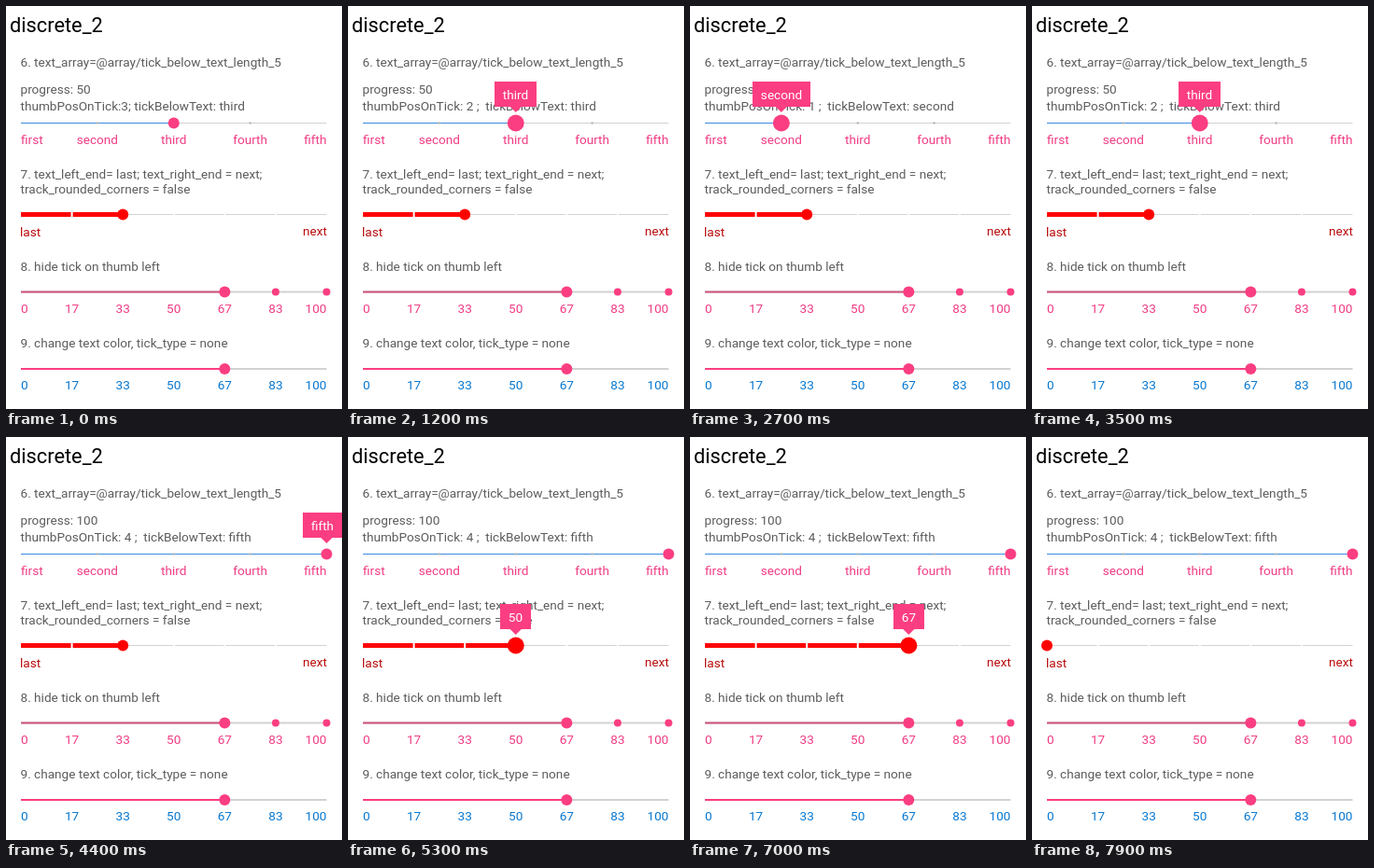
An HTML page for the animation above (8000 ms loop, 360 px wide and 432 px high).

```html
<!DOCTYPE html>
<html lang="en">
<head>
<meta charset="utf-8">
<title>Discrete sliders</title>
<style>
  html, body { margin: 0; width: 100%; height: 100%; overflow: hidden; background: #fff; }
  svg { display: block; width: 360px; height: 432px; }
  text { font: 13.6px Roboto, sans-serif; fill: #5c5c5c; white-space: pre; }
  .title { font-size: 21.8px; fill: #000; }
  .pink { fill: #f03c84; }
  .red { fill: #b80c0c; }
  .blue { fill: #0878d0; }
  .white { fill: #fff; }
</style>
</head>
<body>
<svg id="stage" viewBox="0 0 360 432"></svg>
<script>
const LOOP = 8000, WIDTH = 360, LEFT = 16, RIGHT = 343.5;
const PINK = '#fb3e81', RED = '#ff0000', GRAY = '#d2d2d2', BLUE = '#3a8be0', MAUVE = '#d0557f';
const WORDS = ['first', 'second', 'third', 'fourth', 'fifth'];
const PERCENTS = Array.from({ length: 7 }, (_, i) => Math.round(i * 100 / 6));
const stage = document.getElementById('stage');

function add(tag, attrs, parent = stage) {
  const node = document.createElementNS('http://www.w3.org/2000/svg', tag);
  set(node, attrs);
  return parent.appendChild(node);
}

function set(node, attrs) {
  for (const key in attrs) node.setAttribute(key, attrs[key]);
}

function label(x, y, content, cls = '', anchor = 'start', parent = stage) {
  const node = add('text', { x, y, class: cls, 'text-anchor': anchor }, parent);
  node.textContent = content;
  return node;
}

const caption = (y, content) => label(15.5, y, content);
const line = (y, stroke, width, x2 = RIGHT) =>
  add('line', { x1: LEFT, x2, y1: y, y2: y, stroke, 'stroke-width': width });
const dot = (cx, cy, r, fill) => add('circle', { cx, cy, r, fill });
const tickX = (i, count) => LEFT + (RIGHT - LEFT) * i / (count - 1);

function tickLabels(names, y, cls) {
  const last = names.length - 1;
  names.forEach((name, i) => {
    const anchor = i === 0 ? 'start' : i === last ? 'end' : 'middle';
    label(tickX(i, names.length), y, name, cls, anchor);
  });
}

function makeBubble(trackY) {
  const group = add('g', {});
  const top = Math.round(trackY - 45);
  const box = add('rect', { y: top, height: 27, fill: PINK }, group);
  const arrow = add('path', { fill: PINK }, group);
  const text = label(0, top + 18.5, '', 'white', 'middle', group);
  return (visible, x, content) => {
    set(group, { visibility: visible ? 'visible' : 'hidden' });
    text.textContent = content;
    const width = Math.round(text.getComputedTextLength() + 18);
    const left = Math.round(Math.max(0, Math.min(WIDTH - width, x - width / 2)));
    set(box, { x: left, width });
    set(text, { x: left + width / 2 });
    set(arrow, { d: `M${x - 6.5} ${top + 26.5}h13l-6.5 6.5z` });
  };
}

// A live slider: the finger goes from one tick to another and back, the thumb snaps to ticks.
function makeSlider({ y, names, track, thickness, color, marks, drag }) {
  line(y, GRAY, 1);
  const fill = line(y, track, thickness);
  for (let i = 1; i < names.length - 1; i++) marks(tickX(i, names.length), y);
  const thumb = dot(0, y, 6, color);
  const showBubble = makeBubble(y);
  return time => {
    const tick = Math.round(finger(time, drag));
    const x = tickX(tick, names.length);
    const pressed = time >= drag.press && time < drag.release;
    set(fill, { x2: x });
    set(thumb, { cx: x, r: pressed ? 9 : 6 });
    showBubble(time >= drag.press && time < drag.release + 200, x, names[tick]);
    return tick;
  };
}

const progress = (time, start, end) => Math.max(0, Math.min(1, (time - start) / (end - start)));

function finger(time, { press, turn, end, from, via, to, ease = 1 }) {
  return from + (via - from) * progress(time, press, turn)
    + (to - via) * progress(time, turn, end) ** ease;
}

label(4, 28, 'discrete_2', 'title');
caption(65, '6. text_array=@array/tick_below_text_length_5');
const progressText = caption(94, '');
const detailText = caption(112, '');
tickLabels(WORDS, 148, 'pink');
caption(185, '7. text_left_end= last; text_right_end = next;');
caption(201, 'track_rounded_corners = false');
label(15, 247, 'last', 'red');
label(344, 245.5, 'next', 'red', 'end');
caption(284, '8. hide tick on thumb left');
tickLabels(PERCENTS, 329, 'pink');
caption(366, '9. change text color, tick_type = none');
tickLabels(PERCENTS, 411, 'blue');

for (const [y, color] of [[306.5, MAUVE], [389, PINK]]) {
  line(y, GRAY, 2);
  line(y, color, 2, tickX(4, 7));
  dot(tickX(4, 7), y, 6, PINK);
}
for (const i of [5, 6]) dot(tickX(i, 7), 306.5, 4, PINK);

const poseWords = makeSlider({
  y: 125.5, names: WORDS, track: BLUE, thickness: 1, color: PINK,
  marks: (x, y) => dot(x, y, 1.2, '#b5b5b5'),
  drag: { press: 1000, turn: 2100, end: 4500, release: 4400, from: 2, via: 0, to: 4, ease: 1.15 }
});
const posePercents = makeSlider({
  y: 223.5, names: PERCENTS, track: RED, thickness: 5, color: RED,
  marks: (x, y) => add('rect', { x: x - 1, y: y - 3, width: 2, height: 6, fill: '#fff' }),
  drag: { press: 4900, turn: 6700, end: 7450, release: 7700, from: 2, via: 6, to: 0 }
});

function draw(time) {
  const tick = poseWords(time);
  posePercents(time);
  const position = time < 1000 ? ':3; ' : `: ${tick} ;  `;
  progressText.textContent = `progress: ${tick * 25}`;
  detailText.textContent = `thumbPosOnTick${position}tickBelowText: ${WORDS[tick]}`;
}

let origin;
function frame(now) {
  origin ??= now;
  draw((now - origin) % LOOP);
  requestAnimationFrame(frame);
}
draw(0);
requestAnimationFrame(frame);
</script>
</body>
</html>
```
